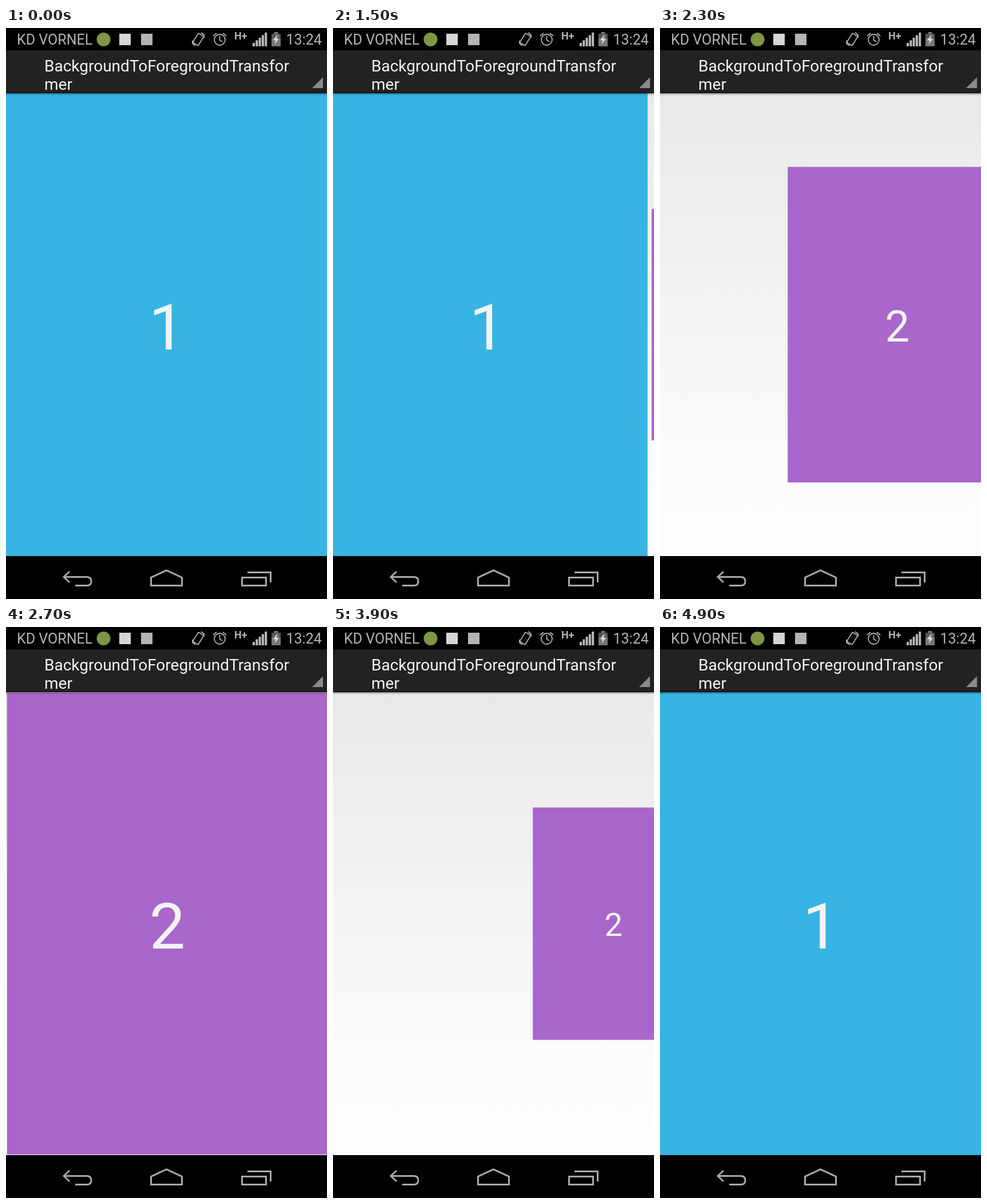
Recreate the animation shown at these times as an HTML page. Size 561 by 998 pixels, loop 5 s.

```html
<!DOCTYPE html>
<html lang="en">
<head>
<meta charset="utf-8">
<title>Pager transition</title>
<style>
  html, body { margin: 0; width: 100%; height: 100%; overflow: hidden; background: #000; }
  svg { display: block; width: 100%; height: 100%; }
  text { font-family: Roboto, "Noto Sans", sans-serif; }
  .digit { font-size: 112.2px; fill: #f3f3f3; text-anchor: middle; }
  .title { font-size: 28px; fill: #f3f3f3; }
  .status { font-size: 25px; fill: #b4b4b4; }
  .line { fill: none; stroke: #a9a9a9; stroke-width: 3; }
  .thin { fill: none; stroke: #b4b4b4; stroke-width: 1.8; }
</style>
</head>
<body>
<svg viewBox="0 0 561 998">
  <defs>
    <linearGradient id="paper" x2="0" y2="1">
      <stop offset="0" stop-color="#e9e9e9"/>
      <stop offset=".77" stop-color="#fbfbfb"/>
      <stop offset="1" stop-color="#fdfdfd"/>
    </linearGradient>
    <linearGradient id="shade" x2="0" y2="1">
      <stop offset="0" stop-opacity=".35"/>
      <stop offset="1" stop-opacity="0"/>
    </linearGradient>
  </defs>

  <!-- pager -->
  <rect y="114" width="561" height="809" fill="url(#paper)"/>
  <g id="one">
    <rect y="114" width="561" height="809" fill="#37b4e4"/>
    <text class="digit" x="281" y="562">1</text>
  </g>
  <g id="two">
    <rect y="114" width="561" height="809" fill="#a966cb"/>
    <text class="digit" x="281" y="562">2</text>
  </g>

  <!-- action bar -->
  <rect y="38" width="561" height="76" fill="#222"/>
  <rect y="112" width="561" height="2" fill="#141414"/>
  <rect y="114" width="561" height="4" fill="url(#shade)"/>
  <text class="title" x="67" y="76">BackgroundToForegroundTransfor</text>
  <text class="title" x="67" y="108">mer</text>
  <path d="M554 86V105H535Z" fill="#8a8a8a"/>

  <!-- status bar -->
  <rect width="561" height="39" fill="#000"/>
  <text class="status" x="19" y="29">KD VORNEL</text>
  <circle cx="170.5" cy="20" r="12" fill="#7f9645"/>
  <rect x="198" y="10" width="20" height="20" fill="#d6d6d6"/>
  <rect x="236" y="10" width="20" height="20" fill="#b4b4b4"/>
  <g class="thin">
    <rect x="330.5" y="10.5" width="11" height="19" rx="1.5" transform="rotate(32 336 20)"/>
    <path d="M326 22V27L331 31M346 17V12L341 8"/>
    <circle cx="373.5" cy="20.5" r="9.5"/>
    <path d="M373.5 14V21L378 24M362 14L368 9M385 14L379 9"/>
  </g>
  <text x="399" y="20" font-size="18" font-weight="700" fill="#b4b4b4">H+</text>
  <g id="bars" fill="#b8b8b8"></g>
  <path d="M468.5 7H475.5V10H480V32H464V10H468.5Z" fill="#777"/>
  <path d="M474 12L467 21.5H471.5L469 29L477 19H472.5Z" fill="#e0e0e0"/>
  <path d="M464 10H480V18H476L477 12H473L468 18H464Z" fill="#555"/>
  <text class="status" x="489.5" y="29">13:24</text>

  <!-- navigation bar -->
  <rect y="923" width="561" height="75" fill="#000"/>
  <g class="line">
    <path d="M111 950L101 959.5L111 969M101 959.5H141Q149 959.5 149 967T141 974.5H121"/>
    <path d="M253.5 974.5V960.5L280.5 948L307.5 960.5V974.5Z"/>
    <path d="M412.5 960.5H454.5V974.5H412.5ZM422 951.5H462.5V969"/>
  </g>
</svg>
<script>
const W = 561, MID = 518.5, LOOP = 5000, STEP = 100;
const one = document.getElementById('one');
const two = document.getElementById('two');

document.getElementById('bars').innerHTML = [0, 1, 2, 3, 4].map(i => {
  const h = 6 + i * 4.5;
  return `<rect x="${431 + i * 5.3}" y="${32 - h}" width="4" height="${h}"/>`;
}).join('');

const linear = u => u;
const settle = u => 1 - (1 - u) ** 3;

// time, scroll offset in pages, easing towards that stop
const stops = [
  [0, 0], [1400, 0], [1500, .01], [1600, .01], [1700, .04], [1900, .179], [2200, .45],
  [2800, 1, settle], [3100, 1], [3200, .985], [3300, .94], [3500, .801], [4300, .203],
  [4900, 0, settle], [LOOP, 0]
];

function scrollAt(t) {
  const i = stops.findIndex(s => s[0] > t);
  const [t0, a] = stops[i - 1];
  const [t1, b, ease = linear] = stops[i];
  return a + (b - a) * ease((t - t0) / (t1 - t0));
}

function place(page, pos) {
  const scale = pos < 0 ? 1 : Math.max(.5, 1 - pos);
  const shift = W * pos * (pos < 0 ? 2 : .75);
  page.setAttribute('transform',
    `translate(${W / 2 + shift} ${MID}) scale(${scale}) translate(${-W / 2} ${-MID})`);
}

function draw(now) {
  const t = Math.floor((now % LOOP) / STEP) * STEP;
  const p = scrollAt(t);
  place(one, -p);
  place(two, 1 - p);
}

const start = performance.now();
function tick() {
  draw(performance.now() - start);
  requestAnimationFrame(tick);
}
tick();
</script>
</body>
</html>
```
